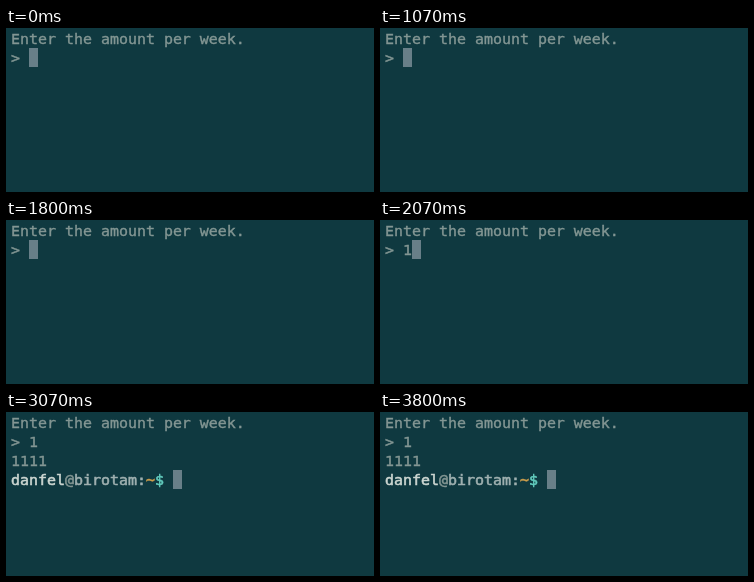
Write an HTML page that moves like this. It is 368 px wide and 164 px high and loops after 3940 ms.

```html
<!DOCTYPE html>
<html lang="en">
<head>
<meta charset="utf-8">
<title>Terminal</title>
<style>
  html, body { margin: 0; width: 100%; height: 100%; overflow: hidden; background: #0f3940; }
  pre {
    position: absolute; left: 5px; top: 2px; margin: 0;
    font: 14.95px/19px "DejaVu Sans Mono", monospace;
    color: #839693;
    -webkit-text-stroke: 0.4px;
  }
  #cursor { position: absolute; width: 9px; height: 19px; background: #687f88; }
  .prompt { -webkit-text-stroke: 0.6px; }
  .user { color: #ccd6d1; }
  .host { color: #9fb0b0; }
  .path { color: #cf9f4c; }
  .sign { color: #62cbbd; }
</style>
</head>
<body>
<pre>Enter the amount per week.
&gt; <span id="typed">1</span>
<span id="output">1111
<span class="prompt"><span class="user">danfel</span>@<span class="host">birotam:</span><span class="path">~</span><span class="sign">$</span></span></span></pre>
<div id="cursor"></div>
<script>
const LOOP = 3940, TYPE = 2070, ENTER = 2670;
const BLINKS = [[1330, 1800], [3330, 3800]];
const CELL = 9, ROW = 19;
const [typed, output, cursor] = ["typed", "output", "cursor"].map(id => document.getElementById(id));

const show = (el, on) => { el.style.visibility = on ? "visible" : "hidden"; };

function placeCursor(col, row) {
  cursor.style.left = 5 + col * CELL + "px";
  cursor.style.top = 1 + row * ROW + "px";
}

function draw(now) {
  const t = now % LOOP;
  show(typed, t >= TYPE);
  show(output, t >= ENTER);
  show(cursor, !BLINKS.some(([off, on]) => t >= off && t < on));
  if (t >= ENTER) placeCursor(18, 3);
  else placeCursor(t >= TYPE ? 3 : 2, 1);
}

const start = performance.now();
function tick() {
  draw(performance.now() - start);
  requestAnimationFrame(tick);
}
tick();
</script>
</body>
</html>
```
